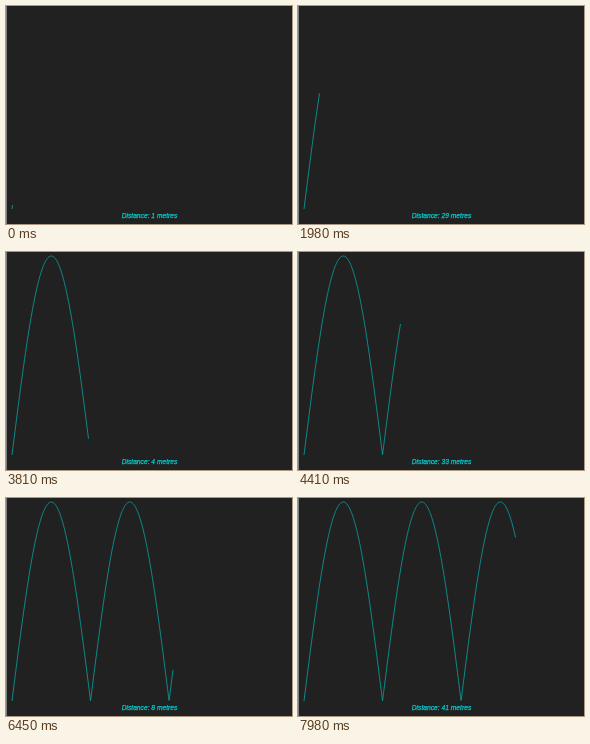
An HTML page with a canvas for the animation above (8 s loop, 286 by 218 pixels).

```html
<!DOCTYPE html>
<html lang="en">
<head>
<meta charset="utf-8">
<title>Distance trace</title>
<style>
  html, body { margin: 0; width: 100%; height: 100%; overflow: hidden; background: #212121; }
  canvas { display: block; width: 286px; height: 218px; }
</style>
</head>
<body>
<canvas id="stage"></canvas>
<script>
const W = 286, H = 218, LOOP = 8000, TICK = 30;
const X0 = 6, BASE = 203, HEIGHT = 199, RADIUS = 25;
const INK = '#00ced1', TRACE = '#0aa5a5';

// Pen position over time: [ms, x]; the trace restarts at 1530 ms.
const KEYS = [
  [0, 6.5], [810, 30], [1290, 45], [1500, 52], [1530, 6.5],
  [5670, 144.5], [6450, 167], [6480, 167.5], [7980, 217.5]
];

const canvas = document.getElementById('stage');
const ctx = canvas.getContext('2d');
const ratio = window.devicePixelRatio || 1;
canvas.width = W * ratio;
canvas.height = H * ratio;
ctx.scale(ratio, ratio);

const wave = x => Math.abs(Math.sin((x - X0) / RADIUS));

function penX(t) {
  let i = 1;
  while (i < KEYS.length - 1 && t >= KEYS[i][0]) i++;
  const [t0, a] = KEYS[i - 1], [t1, b] = KEYS[i];
  const x = a + (b - a) * (t - t0) / (t1 - t0);
  return Math.round(x * 2) / 2;
}

function drawTrace(end) {
  ctx.beginPath();
  ctx.moveTo(X0, BASE);
  for (let x = X0 + 0.5; x <= end; x += 0.5) {
    ctx.lineTo(x, BASE - HEIGHT * wave(x));
  }
  ctx.strokeStyle = TRACE;
  ctx.lineWidth = 0.8;
  ctx.lineJoin = 'round';
  ctx.stroke();
}

function drawLabel(metres) {
  const label = `Distance: ${metres} metres`;
  ctx.font = 'italic 6.7px "Liberation Sans", Arial, sans-serif';
  ctx.textAlign = 'center';
  ctx.fillStyle = ctx.strokeStyle = INK;
  ctx.lineWidth = 0.25;
  ctx.fillText(label, 143.5, 212.4);
  ctx.strokeText(label, 143.5, 212.4);
}

function draw(now) {
  const t = Math.floor((now % LOOP) / TICK) * TICK;
  const x = penX(t);
  ctx.fillStyle = '#212121';
  ctx.fillRect(0, 0, W, H);
  ctx.fillStyle = '#808080';
  ctx.fillRect(0, 0, 1, H);
  drawTrace(x);
  drawLabel(Math.round(50 * wave(x)));
}

const start = performance.now();
function frame() {
  draw(performance.now() - start);
  requestAnimationFrame(frame);
}
frame();
</script>
</body>
</html>
```
